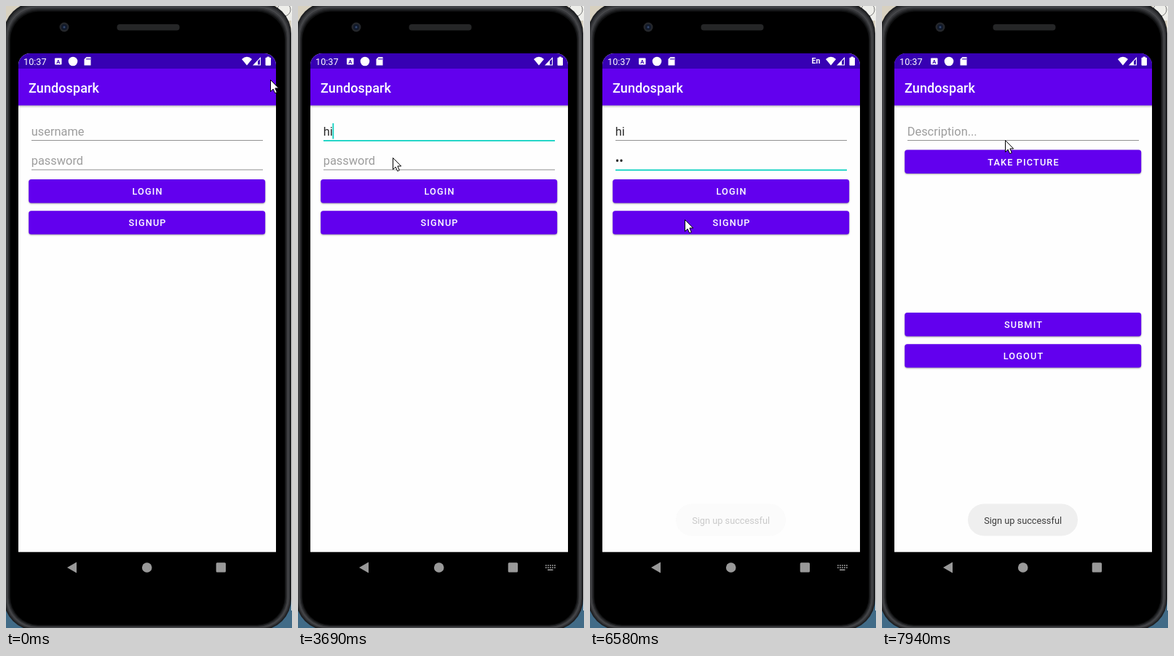
Write an HTML page with a canvas that moves like this. It is 393x854 px and loops after 8 s.

```html
<!DOCTYPE html>
<html lang="en">
<head>
<meta charset="utf-8">
<title>Sign up</title>
<style>
  html, body { margin: 0; width: 100%; height: 100%; overflow: hidden; background: #000; }
  canvas { display: block; width: 393px; height: 854px; }
</style>
</head>
<body>
<canvas id="stage"></canvas>
<script>
const W = 393, H = 854, LOOP = 8000, STEP = 137;
const canvas = document.getElementById('stage');
const ctx = canvas.getContext('2d');
const ratio = window.devicePixelRatio || 1;
canvas.width = W * ratio;
canvas.height = H * ratio;

const PURPLE = '#6200ee', DARK = '#3700b3', TEAL = '#10d2c2', PAGE = '#fefefe';
const SCREEN = { x: 17, y: 65, w: 354, h: 728 };
const MID = { x: 194, y: 429 };
const BLINK = 500, MASK_DELAY = 1500;

const USER_FOCUS = 1770, PASS_FOCUS = 4030, KEYBOARD_ON = 1890, LANGUAGE_ON = 4260;
const TOAST_START = 6510, OPEN_START = 6833;
const userKeys = [2450, 2650], passKeys = [4660, 4800];
const TYPED = 'hi';

// Curved pointer moves; each starts where the last one ended.
const restPoint = [363, 101];
const moves = [
  { start: 650, steps: 8, bend: [270, 50], to: [156, 165] },
  { start: 3277, steps: 4, bend: [130, 338], to: [130, 208] },
  { start: 5470, steps: 4, bend: [130, 250], to: [130, 293] },
  { start: 7110, steps: 7, bend: [228, 328], to: [169, 184] }
];

const clamp = v => Math.min(1, Math.max(0, v));
const smooth = p => p * p * (3 - 2 * p);
const stepped = (t, start) => Math.floor((t - start) / STEP) * STEP;

function pointerAt(t) {
  let at = restPoint;
  for (const { start, steps, bend, to } of moves) {
    if (t < start) break;
    const p = smooth(clamp((stepped(t, start) / STEP + 1) / steps));
    at = at.map((a, i) => (1 - p) ** 2 * a + 2 * p * (1 - p) * bend[i] + p * p * to[i]);
  }
  return at;
}

function caretOn(t, focus, keys) {
  const last = Math.max(...[focus, ...keys].filter(k => k <= t));
  return t >= focus && (t - last) % (2 * BLINK) < BLINK;
}

const typed = (t, keys) => TYPED.slice(0, keys.filter(k => k <= t).length);

function masked(t, keys) {
  const shown = typed(t, keys);
  return [...shown].map((c, i) =>
    i < shown.length - 1 || t > keys[i] + MASK_DELAY ? '•' : c).join('');
}

function openProgress(t) {
  const age = stepped(t, OPEN_START);
  return age <= 0 ? 0 : age >= 3 * STEP ? 1 : 1 - Math.exp(-age / 50);
}

function rect(x, y, w, h, color) {
  ctx.fillStyle = color;
  ctx.fillRect(x, y, w, h);
}

function rounded(x, y, w, h, r, color) {
  ctx.beginPath();
  ctx.roundRect(x, y, w, h, r);
  ctx.fillStyle = color;
  ctx.fill();
}

function disc(x, y, r, color) {
  ctx.beginPath();
  ctx.arc(x, y, r, 0, Math.PI * 2);
  ctx.fillStyle = color;
  ctx.fill();
}

function shape(color, ...points) {
  ctx.beginPath();
  points.forEach(([x, y]) => ctx.lineTo(x, y));
  ctx.closePath();
  ctx.fillStyle = color;
  ctx.fill();
}

function text(str, x, y, size, color, { weight = 400, spacing = 0, align = 'left' } = {}) {
  ctx.font = `${weight} ${size}px Roboto, sans-serif`;
  ctx.letterSpacing = spacing + 'px';
  ctx.textAlign = align;
  ctx.fillStyle = color;
  ctx.fillText(str, x, y);
  return ctx.measureText(str).width;
}

function scaled(scale, draw) {
  ctx.save();
  ctx.translate(MID.x, MID.y);
  ctx.scale(scale, scale);
  ctx.translate(-MID.x, -MID.y);
  draw();
  ctx.restore();
}

function drawPhone() {
  rect(0, 0, W, H / 2, '#d8d1c0');
  rect(0, H / 2, W, H / 2, '#416b87');
  rect(372, 0, 21, 20, '#eeeeea');
  ctx.lineWidth = 1;
  ctx.strokeStyle = '#777';
  ctx.beginPath();
  ctx.arc(382, 5, 9, 0, Math.PI * 2);
  ctx.stroke();
  rect(392, 14, 1, 816, '#e8e8e8');

  const rim = ['#1d1e20', '#2b2c2f', '#3b3c3f', '#46474a', '#343538', '#222325', '#101112', '#000'];
  rim.forEach((color, i) => {
    const inset = i * 1.3;
    rounded(-3 + inset, -5 + inset * 1.4, 395 - inset * 2, 862 - inset * 2.2, 43 - inset / 2, color);
  });

  disc(80, 29, 6.5, '#25272b');
  disc(80, 29, 4, '#111a2b');
  disc(80, 29, 1.5, '#34486f');
  rounded(152.5, 25, 86, 8.5, 4, '#252627');
}

function drawStatus(t) {
  const white = '#fff';
  text('10:37', 24, 80.5, 12.7, white);
  rounded(67, 71.5, 9.5, 9, 1, white);
  text('A', 71.75, 78.7, 7.5, DARK, { weight: 700, align: 'center' });
  disc(92, 76, 6.3, white);
  shape(white, [110.5, 70], [116.5, 70], [116.5, 81.5], [107.5, 81.5], [107.5, 73]);
  for (let i = 0; i < 3; i++) rect(110.6 + i * 2, 71.5, 1, 2.5, DARK);

  if (t >= LANGUAGE_ON && !openProgress(t)) text('En', 304.5, 79, 10.5, white, { weight: 700 });

  ctx.beginPath();
  ctx.moveTo(331, 81.5);
  ctx.lineTo(324, 73);
  ctx.quadraticCurveTo(331, 66.5, 338, 73);
  ctx.fillStyle = white;
  ctx.fill();
  shape(white, [350, 70], [350, 81.5], [339, 81.5]);
  shape(DARK, [349, 72.8], [349, 80.5], [346, 80.5], [346, 75.7]);
  rounded(356.5, 70.8, 7.5, 11, 1, white);
  rect(358.6, 69.6, 3.3, 2, white);
}

function drawWindow(content) {
  rect(SCREEN.x, SCREEN.y, SCREEN.w, 685, PAGE);
  const shade = ctx.createLinearGradient(0, 136, 0, 140);
  shade.addColorStop(0, 'rgba(0,0,0,.28)');
  shade.addColorStop(1, 'rgba(0,0,0,0)');
  rect(SCREEN.x, 136, SCREEN.w, 4, shade);
  rect(SCREEN.x, SCREEN.y, SCREEN.w, 21.5, DARK);
  rect(SCREEN.x, 86, SCREEN.w, 50.5, PURPLE);
  text('Zundospark', 31, 119, 18, '#fff', { weight: 500, spacing: 0.1 });
  rect(SCREEN.x, 749.7, SCREEN.w, 44, '#000');
  content();
}

function drawButton(label, y) {
  ctx.save();
  ctx.shadowColor = 'rgba(0,0,0,.35)';
  ctx.shadowBlur = 2 * ratio;
  ctx.shadowOffsetY = ratio;
  rounded(31.2, y, 325, 32.4, 3.6, PURPLE);
  ctx.restore();
  text(label, 194.5, y + 21, 12.7, '#fff', { weight: 500, spacing: 1.15, align: 'center' });
}

function drawField(hint, value, base, focused, caret) {
  if (!value) text(hint, 34.7, base, 16.4, '#9d9d9d');
  const width = value ? text(value, 34.7, base, 16.4, '#2c2c2c') : 0;
  if (focused) rect(35, base + 6, 318, 1.8, TEAL);
  else rect(35, base + 6, 318, 1, '#929292');
  if (caret) rect(34.4 + width, base - 17, 1.8, 21.5, TEAL);
}

function drawLogin(t) {
  const onPass = t >= PASS_FOCUS, onUser = t >= USER_FOCUS && !onPass;
  drawField('username', typed(t, userKeys), 178, onUser, onUser && caretOn(t, USER_FOCUS, userKeys));
  drawField('password', masked(t, passKeys), 218.4, onPass, caretOn(t, PASS_FOCUS, passKeys));
  drawButton('LOGIN', 238);
  drawButton('SIGNUP', 281.2);
}

function drawPost() {
  drawField('Description...', '', 178, false, false);
  drawButton('TAKE PICTURE', 197.5);
  drawButton('SUBMIT', 421);
  drawButton('LOGOUT', 464.2);
}

function drawNav(t) {
  const gray = '#999';
  shape(gray, [84, 771], [97, 763.5], [97, 778.5]);
  disc(193.7, 771, 6.8, gray);
  rounded(288.7, 764.3, 13.3, 13.3, 1.5, gray);
  if (t >= KEYBOARD_ON && !openProgress(t)) {
    for (let i = 0; i < 10; i++)
      rect(340 + (i % 5) * 3, 767.3 + (i > 4 ? 3 : 0), 1.7, 1.7, gray);
    rect(343, 773.4, 7.5, 1.6, gray);
  }
}

function drawToast(t) {
  ctx.globalAlpha = clamp((t - TOAST_START) / 280);
  rounded(118, 683.5, 151, 44, 22, '#efefef');
  text('Sign up successful', 193.6, 710.6, 12.75, '#3c3c3c', { align: 'center' });
  ctx.globalAlpha = 1;
}

function drawPointer([x, y]) {
  ctx.save();
  ctx.translate(Math.round(x) + 0.5, Math.round(y) + 0.5);
  shape('#fff', [0, 0], [0, 16], [3.6, 12.5], [6.2, 18.2], [8.8, 17], [6.4, 11.4], [11.2, 11.4]);
  ctx.strokeStyle = '#000';
  ctx.lineWidth = 1;
  ctx.stroke();
  ctx.restore();
}

function draw(t) {
  ctx.setTransform(ratio, 0, 0, ratio, 0, 0);
  drawPhone();

  ctx.save();
  ctx.beginPath();
  ctx.roundRect(SCREEN.x, SCREEN.y, SCREEN.w, SCREEN.h, [16, 16, 0, 0]);
  ctx.clip();
  const p = openProgress(t);
  if (p < 1) scaled(1 + 0.047 * p, () => drawWindow(() => drawLogin(t)));
  if (p > 0) {
    scaled(0.85 + 0.15 * p, () => drawWindow(drawPost));
    rect(SCREEN.x, SCREEN.y, SCREEN.w, 20, DARK);
  }
  drawStatus(t);
  drawNav(t);
  drawToast(t);
  ctx.restore();

  drawPointer(pointerAt(t));
}

const start = performance.now();
function tick() {
  draw((performance.now() - start) % LOOP);
  requestAnimationFrame(tick);
}
tick();
</script>
</body>
</html>
```
